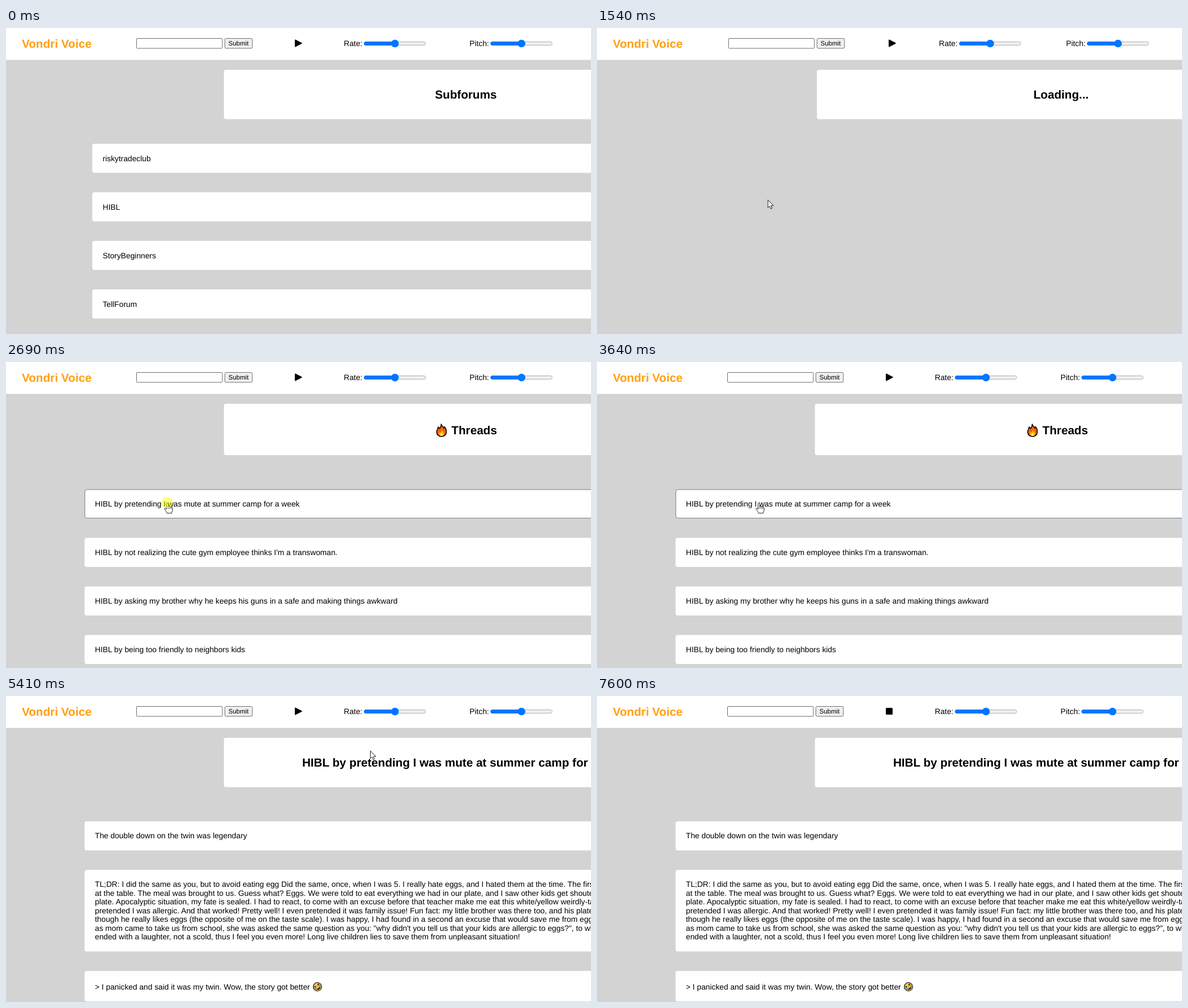
An HTML page with a canvas for the animation above (9470 ms loop, 1033 by 542 pixels).

```html
<!DOCTYPE html>
<html lang="en">
<head>
<meta charset="utf-8">
<title>Vondri Voice</title>
<style>
html, body { margin: 0; width: 100%; height: 100%; overflow: hidden; background: #d3d3d3; }
canvas { display: block; }
</style>
</head>
<body>
<canvas id="stage" width="1033" height="542"></canvas>
<script>
const ctx = document.getElementById('stage').getContext('2d');
const W = 1033, H = 542, LOOP = 9470;
const FACE = '"Liberation Sans", Arial, sans-serif';
const BODY = '13.78px ' + FACE, HEAD = 'bold 20.66px ' + FACE, SMALL = '11.48px ' + FACE;
const BLUE = '#0075ff';

const FORUMS = ['riskytradeclub', 'HIBL', 'StoryBeginners', 'TellForum'];
const THREADS = [
  'HIBL by pretending I was mute at summer camp for a week',
  "HIBL by not realizing the cute gym employee thinks I'm a transwoman.",
  'HIBL by asking my brother why he keeps his guns in a safe and making things awkward',
  'HIBL by being too friendly to neighbors kids'
];
const STORY = [
  'TL;DR: I did the same as you, but to avoid eating egg Did the same, once, when I was 5. I really hate eggs, and I hated them at the time. The first',
  'at the table. The meal was brought to us. Guess what? Eggs. We were told to eat everything we had in our plate, and I saw other kids get shouted',
  'plate. Apocalyptic situation, my fate is sealed. I had to react, to come with an excuse before that teacher make me eat this white/yellow weirdly-tasting',
  'pretended I was allergic. And that worked! Pretty well! I even pretended it was family issue! Fun fact: my little brother was there too, and his plate',
  'though he really likes eggs (the opposite of me on the taste scale). I was happy, I had found in a second an excuse that would save me from eggs',
  'as mom came to take us from school, she was asked the same question as you: "why didn\'t you tell us that your kids are allergic to eggs?", to which',
  'ended with a laughter, not a scold, thus I feel you even more! Long live children lies to save them from unpleasant situation!'
];

// Cursor moves: start, end, number of steps, points along the way
const MOVES = [
  [210, 740, 7, [[1000, 392], [760, 372], [500, 310], [390, 281], [318, 307]]],
  [1460, 1540, 2, [[309, 306], [301.5, 304.5]]],
  [2150, 2460, 5, [[300, 297], [285, 249]]],
  [3640, 3641, 1, [[286, 249]]],
  [4500, 5410, 13, [[286, 249], [272.5, 258], [300, 262], [380, 240], [480, 190], [575, 135], [643, 97]]],
  [5490, 5880, 6, [[630, 90], [585, 62], [540, 38], [523, 33]]],
  [6110, 6260, 3, [[522, 34], [515.5, 30]]],
  [7130, 7520, 6, [[530, 40], [600, 90], [720, 160], [860, 240], [996, 313]]]
];
const CLICKS = [[740, 830], [2690, 2780], [6510, 6680]];
const CARD_H = 51.5, PITCH = 86;
const LISTS = {
  forums: { x: 152.3, y: 205, items: FORUMS },
  threads: { x: 138.7, y: 225.5, items: THREADS }
};

const pageAt = t => t < 990 ? 'forums' : t < 1850 ? 'loading' : t < 4500 ? 'threads' : 'comments';

function along(pts, p) {
  const s = p * (pts.length - 1), i = Math.min(Math.floor(s), pts.length - 2);
  if (i < 0) return pts[0];
  return [0, 1].map(k => pts[i][k] + (pts[i + 1][k] - pts[i][k]) * (s - i));
}

function cardUnder(page, x, y) {
  const list = LISTS[page];
  if (!list || x < list.x) return -1;
  const d = y - list.y, i = Math.floor(d / PITCH);
  return i >= 0 && i < list.items.length && d - i * PITCH < CARD_H ? i : -1;
}

function cursorAt(t) {
  if (t < 210 || t >= 7600) return null;
  const [t0, t1, n, pts] = MOVES.filter(m => m[0] <= t).pop();
  const p = Math.min(1, (t - t0) / (t1 - t0));
  const step = Math.min(n - 1, Math.floor(p * (n - 1) + 0.2));
  const [x, y] = along(pts, n > 1 ? step / (n - 1) : 0);
  const page = pageAt(t0), card = cardUnder(page, x, y);
  const onPlay = x > 508 && x < 523 && y < 36;
  return { x, y, page, card, hand: card >= 0 || onPlay };
}

function text(str, x, y, font = BODY, color = '#000', align = 'left') {
  ctx.font = font;
  ctx.fillStyle = color;
  ctx.textAlign = align;
  ctx.fillText(str, x, y);
}

function box(x, y, w, h, r, fill, stroke) {
  ctx.beginPath();
  ctx.roundRect(x, y, w, h, r);
  ctx.fillStyle = fill;
  ctx.fill();
  if (stroke) {
    ctx.strokeStyle = stroke;
    ctx.lineWidth = 1;
    ctx.stroke();
  }
}

function disc(x, y, r, fill) {
  ctx.beginPath();
  ctx.arc(x, y, r, 0, 7);
  ctx.fillStyle = fill;
  ctx.fill();
}

function shape(d, x, y, fill, stroke, width = 1) {
  const path = new Path2D(d);
  ctx.save();
  ctx.translate(x, y);
  ctx.lineJoin = 'round';
  ctx.lineCap = 'round';
  if (fill) { ctx.fillStyle = fill; ctx.fill(path); }
  if (stroke) { ctx.strokeStyle = stroke; ctx.lineWidth = width; ctx.stroke(path); }
  ctx.restore();
}

const card = (x, y, h, edge) => edge
  ? box(x + 0.5, y + 0.5, W + 20 - x, h - 1, 4, '#fff', '#708090')
  : box(x, y, W + 20 - x, h, 4, '#fff');

function slider(label, lx, x) {
  text(label, lx, 32);
  box(x + 0.5, 24.5, 108.5, 6, 3, '#efefef', '#b2b2b2');
  box(x, 24, 55, 7, 3.5, BLUE);
  disc(x + 54.8, 27.5, 6.8, BLUE);
}

function header(page, t) {
  const wide = page === 'loading';
  const at = (x, shift) => wide ? x + shift : x;
  ctx.fillStyle = '#fff';
  ctx.fillRect(0, 0, W, 56.5);
  text('Vondri Voice', 28, 34.6, HEAD, '#ffa010');
  box(at(230.5, 1.8), 18.5, 151.5, 17.5, 1.5, '#fff', '#6b6b6b');
  box(at(386.5, 2), 18.5, 48.5, 17.5, 2, '#efefef', '#707070');
  text('Submit', at(410.6, 2), 31.4, SMALL, '#000', 'center');
  const px = at(510, 5);
  if (t < 6680) shape('M.8 1.2L12 7L.8 12.8Z', px, 20, '#000', '#000', 1.6);
  else box(px, 21, 12, 12, 1.5, '#000');
  slider('Rate:', at(596.5, 7.3), at(632, 7.5));
  slider('Pitch:', at(818.5, 9.8), at(855.5, 9.7));
}

function fire(x, y) {
  shape('M9 1C9.5 4 12 5 13.5 8C14.5 7.5 14.6 6.5 14.6 5.5C17 8 18.2 11.5 18 15C18 20 14 23 9.5 23C5 23 1 20 1 15C1 11.5 3 10 3.5 6C5 6.5 5.5 8 5.8 9C8 7 9 4 9 1Z',
    x, y, '#f7630c', '#000', 1.6);
  shape('M9.5 11C10.5 13 14 14.5 14 18C14 20.5 12 22 9.5 22C6.8 22 5 20.5 5 18C5 16.5 5.8 15.5 6.2 14.8L7.8 16.2C9 15 9.6 13 9.5 11Z', x, y, '#ffb900');
  shape('M9.6 17C10.5 18 11.6 18.8 11.4 20.2C11 22.2 8 22.2 7.7 20.2C7.6 18.8 9 18.2 9.6 17Z', x, y, '#fff1a0');
}

function rofl(x, y) {
  ctx.save();
  ctx.translate(x, y);
  ctx.rotate(-0.6);
  disc(0, 0, 8, '#000');
  disc(0, 0, 6.9, '#ffc83d');
  shape('M-4.6 .8H4.6C4.4 4 2.6 5.6 0 5.6S-4.4 4 -4.6 .8Z', 0, 0, '#3a2415');
  shape('M-4 1.2H4V2.4H-4Z', 0, 0, '#fff');
  shape('M-4.6 -3.6L-2 -2.2L-4.6 -1M4.6 -3.6L2 -2.2L4.6 -1', 0, 0, null, '#000', 1);
  disc(-5.6, 1.6, 1.7, '#2aa4f4');
  disc(5.6, 1.6, 1.7, '#2aa4f4');
  ctx.restore();
}

function list(page, hover) {
  const { x, y, items } = LISTS[page];
  items.forEach((item, i) => {
    const top = y + i * PITCH;
    card(x, top, CARD_H, i === hover);
    text(item, x + 18.4, top + 30.5);
  });
}

function comments() {
  const x = 138.7, tx = 157;
  card(x, 222, CARD_H);
  text('The double down on the twin was legendary', tx, 252.4);
  card(x, 308, 144.5);
  STORY.forEach((line, i) => text(line, tx, 338.3 + i * 15.5));
  card(x, 487, 54);
  text('> I panicked and said it was my twin. Wow, the story got better', tx, 519.6);
  rofl(550, 515);
}

function content(page, hover) {
  const title = (str, x = 812, y = 124.9) => text(str, x, y, HEAD, '#000', 'center');
  card(page === 'loading' ? 388.3 : 384.8, 74, page === 'threads' ? 91 : 87.6);
  if (page === 'loading') return title('Loading...', 819.5);
  if (page === 'comments') {
    title(THREADS[0]);
    return comments();
  }
  if (page === 'forums') title('Subforums');
  else {
    fire(759.5, 109);
    title('Threads', 826.8, 128.2);
  }
  list(page, hover);
}

function pointer({ x, y, hand }) {
  if (hand) {
    shape('M-1.6 11.5V1.7C-1.6 .1 1.3 .1 1.3 1.7V7C1.6 5.8 4 6 4 7.5C4.5 6.5 6.6 6.8 6.6 8.2C7.2 7.4 9 7.8 9 9.4V13C9 15.5 7.5 16.5 7.5 18.8H-.8C-1 16.8 -3.2 14.6 -4.8 11.8C-5.7 10 -3.6 9 -2.6 10.2Z',
      x, y, '#fff', '#1c1c2c');
    shape('M1.3 7V10.5M4 7.5V10.5M6.6 8.2V11', x, y, null, '#1c1c2c', 0.9);
  } else {
    shape('M.4 .4V13.8L3.4 11L5.4 15.8L7.7 14.8L5.7 10.2H9.7Z', x, y, '#fff', '#1c1c2c');
  }
}

function draw(t) {
  const page = pageAt(t), cur = cursorAt(t);
  ctx.textRendering = 'geometricPrecision';
  ctx.fillStyle = '#d3d3d3';
  ctx.fillRect(0, 0, W, H);
  header(page, t);
  content(page, cur && cur.page === page ? cur.card : -1);
  if (!cur) return;
  pointer(cur);
  if (CLICKS.some(([a, b]) => t >= a && t < b)) disc(cur.x - 0.7, cur.y, 10.2, 'rgba(255,255,0,.47)');
}

const start = performance.now();
function tick() {
  draw((performance.now() - start) % LOOP);
  requestAnimationFrame(tick);
}
tick();
</script>
</body>
</html>
```
